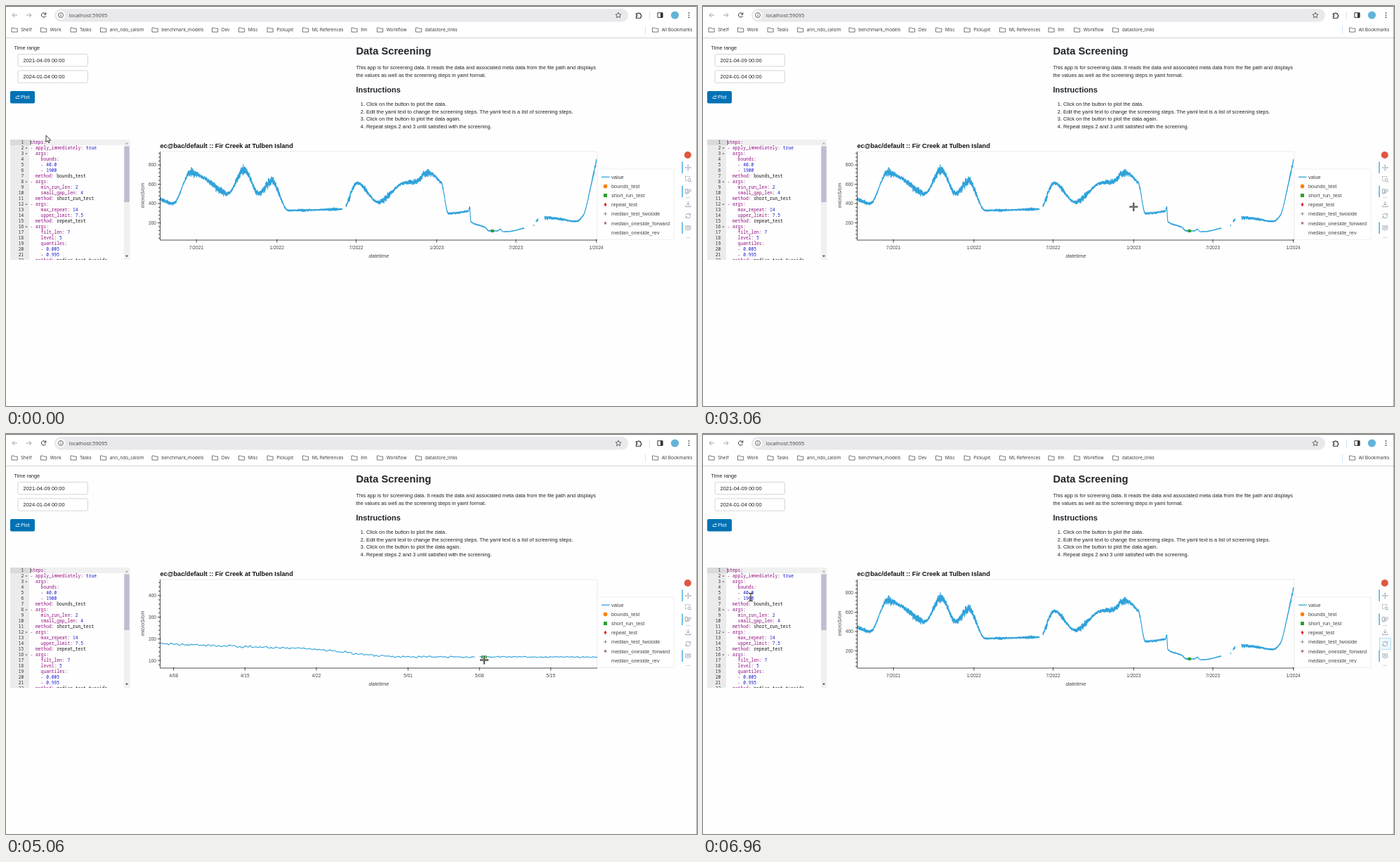
Write an HTML page that moves like this. It is 984 px wide and 569 px high and loops after 8000 ms.

```html
<!DOCTYPE html>
<html lang="en">
<head>
<meta charset="utf-8">
<title>Data Screening</title>
<style>
html, body { margin: 0; width: 100%; height: 100%; overflow: hidden; background: #fefefe; }
svg { display: block; position: absolute; left: 0; top: 0; }
text { font-family: "Liberation Sans", Arial, sans-serif; }
.ui { font-family: "Open Sans", "Noto Sans", sans-serif; }
.code { font-family: "Noto Sans Mono", "Liberation Mono", monospace; font-size: 6.3px; }
</style>
</head>
<body>
<svg id="stage" width="984" height="569" viewBox="0 0 984 569"></svg>
<script>
const LOOP = 8000, BLUE = '#30a2da';
const PLOT = { x: 219.5, y: 207, r: 842, b: 333 };
const stage = document.getElementById('stage');

// ---------- markup helpers ----------
const text = (x, y, s, size, more = 'fill="#222"') => `<text x="${x}" y="${y}" font-size="${size}" ${more}>${s}</text>`;
const rect = (x, y, w, h, fill, more = '') => `<rect x="${x}" y="${y}" width="${w}" height="${h}" fill="${fill}" ${more}/>`;
const line = (d, color, w = 1, more = '') => `<path d="${d}" fill="none" stroke="${color}" stroke-width="${w}" ${more}/>`;
const dot = (x, y, r, fill) => `<circle cx="${x}" cy="${y}" r="${r}" fill="${fill}"/>`;
const icon = (x, y, d, color = '#444', w = 0.9) => line(d, color, w, `transform="translate(${x} ${y})"`);

// ---------- browser frame ----------
function browser() {
  const folders = { Shelf: 12, Work: 53.5, Tasks: 96, ann_ndo_calsim: 138.5, benchmark_models: 212, Dev: 297.5, Misc: 335.5,
    Pickupit: 376, 'ML References': 426.5, llm: 496, Workflow: 532.5, datastore_links: 587.5, 'All Bookmarks': 924.5 };
  const arrow = 'M3.5 0H-3.5M-.5 -3L-3.5 0L-.5 3';
  let s = rect(0, 0, 984, 45, '#fff') + rect(0, 0, 984, 1, '#666') + rect(0, 45, 984, 1, '#d2d2d2') + rect(983, 0, 1, 569, '#aaa');
  s += rect(69, 4, 817, 18.5, '#e9e9eb', 'rx="9.2"') + dot(78, 13, 6.5, '#fbfbfb');
  s += icon(12.5, 13, arrow, '#999') + line(arrow, '#999', 0.9, 'transform="translate(32.5 13) scale(-1 1)"');
  s += icon(53.5, 13, 'M2.9 -1.4A3.1 3.1 0 1 0 3 1M3.3 -3.6V-.9H.6', '#333', 1);
  s += '<circle cx="78" cy="13" r="3.5" fill="none" stroke="#444" stroke-width=".8"/>' + icon(78, 13, 'M0 -.4V2M0 -2V-1.2', '#444', 0.8);
  s += text(89.5, 15.8, 'localhost:59095', 7.5, 'class="ui" fill="#444"');
  s += icon(872, 13, 'M0 -4L1.2 -1.3L4 -1L1.9 .9L2.5 3.7L0 2.2L-2.5 3.7L-1.9 .9L-4 -1L-1.2 -1.3Z', '#444', 0.8);
  s += icon(901, 13.3, 'M-3.6 -2.4H-1.4A1.2 1.2 0 1 1 1 -2.4H2.8V-.5A1.2 1.2 0 1 1 2.8 2V4H-3.6V1.8A1.2 1.2 0 1 0 -3.6 -.5Z', '#333', 1.1);
  s += rect(916, 8, 0.8, 11, '#c6dcf5') + icon(931.5, 13, 'M-3.6 -3.3H3.6V3.3H-3.6Z', '#333', 1) + rect(932, 10, 3.2, 6.5, '#333');
  s += dot(952.5, 13, 5.6, '#62b4d8');
  for (let i = -1; i < 2; i++) s += dot(972.5, 13 + i * 3.2, 0.85, '#333');
  for (const name in folders) {
    const x = folders[name];
    s += icon(x, 34, 'M-4 -3H-1L0 -2H4.2V3H-4Z', '#555', 0.8) + text(x + 9.2, 36.4, name, 6.55, 'class="ui" fill="#333"');
  }
  return s + rect(910, 29, 0.8, 11, '#c6dcf5');
}

// ---------- page texts and form ----------
function page() {
  let s = text(11.5, 62, 'Time range', 7.3);
  ['2021-04-09 00:00', '2024-01-04 00:00'].forEach((v, i) => {
    const y = 68.5 + i * 23.4;
    s += rect(17, y, 99.5, 17.3, '#fff', 'rx="2" stroke="#ccc" stroke-width=".8"') + text(24.5, y + 11.3, v, 7.5);
  });
  s += rect(6, 121, 35, 17.5, '#0072b5', 'rx="2"') + text(21, 132, 'Plot', 7.3, 'fill="#fff"');
  s += icon(16.5, 129.5, 'M2.6 2H-2.4V.2L-1 -1.2H2.6M1.2 -2.4L2.6 -1.2L1.2 0', '#fff', 0.8);
  s += text(498.5, 69.4, 'Data Screening', 14.7, 'font-weight="700" fill="#212529"');
  s += text(498.5, 90, 'This app is for screening data. It reads the data and associated meta data from the file path and displays', 7.4);
  s += text(498.5, 101, 'the values as well as the screening steps in yaml format.', 7.4);
  s += text(498.5, 122.5, 'Instructions', 11.1, 'font-weight="700" fill="#212529"');
  ['Click on the button to plot the data.',
    'Edit the yaml text to change the screening steps. The yaml text is a list of screening steps.',
    'Click on the button to plot the data again.',
    'Repeat steps 2 and 3 until satisfied with the screening.'].forEach((item, i) => {
    const y = 142 + i * 10.65;
    s += text(504.8, y, i + 1 + '.', 7.4) + text(513, y, item, 7.4);
  });
  return s;
}

// ---------- yaml editor ----------
const YAML = `steps:
- apply_immediately: true
  args:
    bounds:
    - 40.0
    - 1900
  method: bounds_test
- args:
    min_run_len: 2
    small_gap_len: 4
  method: short_run_test
- args:
    max_repeat: 14
    upper_limit: 7.5
  method: repeat_test
- args:
    filt_len: 7
    level: 5
    quantiles:
    - 0.005
    - 0.995
  method: median_test_twoside`;

function editor() {
  const span = (s, color) => s ? `<tspan fill="${color}">${s}</tspan>` : '';
  let s = rect(6, 190, 27, 171, '#ebebeb') + rect(6, 190, 27, 8, '#dadada') + rect(33, 190, 135, 8, '#f0f0f0');
  YAML.split('\n').forEach((row, i) => {
    const [, pad, dash, key, value] = row.match(/^(\s*)(- )?(\w+: ?)?(.*)$/);
    const y = 196.3 + i * 8;
    s += text(25.3, y, i + 1, 6.3, 'class="code" text-anchor="end" fill="#333"');
    if ((dash && key) || i === 2) s += `<path d="M27.4 ${y - 2.8}h3l-1.5 1.8z" fill="#555"/>`;
    s += `<text class="code" x="${34.5 + pad.length * 3.78}" y="${y}">` + span(dash, '#b90690') + span(key, '#930f80') +
      span(value, /^(\d|true)/.test(value) ? '#1a1acd' : '#111') + '</text>';
  });
  s += rect(34.4, 190.5, 0.7, 7.5, '#333');
  s += rect(168, 190, 8.5, 171, '#f0f0f0') + rect(168.3, 199.5, 7.4, 79.5, '#bfbdd2');
  s += '<path d="M170 196.4h4l-2 -2.4z" fill="#a5a5a5"/><path d="M170 354.8h4l-2 2.4z" fill="#444"/>';
  return `<g clip-path="url(#edit)">${s}</g>`;
}

// ---------- plot surroundings ----------
function plotFrame() {
  const label = 'fill="#444" font-style="italic" text-anchor="middle"';
  return text(219.5, 202.2, 'ec@bac/default :: Fir Creek at Tulben Island', 9.15, 'font-weight="700" fill="#111"') +
    line(`M${PLOT.x} ${PLOT.y}H${PLOT.r}V${PLOT.b}`, '#e5e5e5', 0.8) +
    text(531, 357.6, 'datetime', 7.5, label) +
    text(0, 0, 'microS/cm', 7.5, label + ' transform="translate(196.8 269.5) rotate(-90)"');
}

function legend() {
  let s = rect(842, 232, 109, 100.5, '#fff', 'stroke="#ececec" stroke-width=".8"');
  ['value', 'bounds_test', 'short_run_test', 'repeat_test', 'median_test_twoside', 'median_oneside_forward', 'median_oneside_rev']
    .forEach((name, i) => { s += text(862, 245.8 + i * 13.15, name, 7.4, 'fill="#444"'); });
  s += line('M848 243.3H859.5', BLUE, 1.3) + dot(853.5, 256.4, 2.8, '#ff7f0e') + rect(851, 267, 5, 5, '#2ca02c');
  s += '<path d="M853.5 279.4l2 3.1l-2 3.1l-2 -3.1z" fill="#e02a2a"/>';
  s += icon(853.5, 295.6, 'M-2.4 0H2.4M0 -2.4V2.4', '#777', 0.8);
  return s + icon(853.5, 308.9, 'M-2 0H2M0 -2V2M-1.5 -1.5L1.5 1.5M-1.5 1.5L1.5 -1.5', '#8c564b', 0.8);
}

function toolbar() {
  const grey = '#98a0a4';
  let s = dot(970.8, 212, 5, '#e0573f');
  for (const y of [221.5, 255.5, 307.5]) s += rect(962.3, y, 1.6, 16.5, '#54b3e6');
  s += icon(971.3, 230, 'M-4 0H4M0 -4V4M-2.8 -1.2L-4 0L-2.8 1.2M2.8 -1.2L4 0L2.8 1.2M-1.2 -2.8L0 -4L1.2 -2.8M-1.2 2.8L0 4L1.2 2.8', grey, 0.8);
  s += line('M967.5 242.5H974V245M967.5 242.5V249H970', grey, 0.9, 'stroke-dasharray="1.4 .9"');
  s += icon(973, 247.8, 'M2 0A2 2 0 1 0 -2 0A2 2 0 1 0 2 0M1.5 1.5L3 3', grey);
  s += icon(971.3, 264, 'M-4 -3.4H-.6V2H-4ZM-2.4 2V4M4 -1.5A1.8 1.8 0 1 0 .4 -1.5A1.8 1.8 0 1 0 4 -1.5M1 0L0 3.4', grey);
  s += icon(971.3, 282, 'M0 -4V1.3M-2 -.8L0 1.3L2 -.8M-3.6 1.5V3.6H3.6V1.5', grey);
  s += icon(971.3, 298.5, 'M-3.4 -.6A3.5 3.5 0 0 1 3 -1.6M3.4 -3.4V-1.2H1.2M3.4 .6A3.5 3.5 0 0 1 -3 1.6M-3.4 3.4V1.2H-1.2', grey);
  s += icon(971.3, 315.8, 'M-3.5 -3H3.5V2H1.2L0 3.6L-1.2 2H-3.5ZM-2 -1.3H2M-2 .4H2', grey, 0.8);
  for (const y of [272.5, 329.3]) for (let i = -1; i < 2; i++) s += dot(971.3 + i * 2, y, 0.5, '#888');
  return s;
}

// ---------- conductance series over days since 2021-04-09 ----------
const FULL = 0.6231, START = Date.UTC(2021, 3, 9), MID = 759.47;

// monotone cubic through key points given in overview pixels
function curve(...keys) {
  const p = keys.map(([x, y]) => [(x - PLOT.x) / FULL, 100 + (322.2 - y) / 0.1372]);
  const n = p.length - 1;
  const s = p.slice(1).map((q, i) => (q[1] - p[i][1]) / (q[0] - p[i][0]));
  const m = p.map((_, i) => i === 0 ? s[0] : i === n ? s[n - 1] : s[i - 1] * s[i] > 0 ? 2 * s[i - 1] * s[i] / (s[i - 1] + s[i]) : 0);
  const value = d => {
    const i = Math.max(0, Math.min(n - 1, p.findIndex(q => q[0] > d) - 1));
    const h = p[i + 1][0] - p[i][0], f = (d - p[i][0]) / h, g = 1 - f;
    return g * g * (1 + 2 * f) * p[i][1] + f * f * (1 + 2 * g) * p[i + 1][1] + f * g * h * (g * m[i] - f * m[i + 1]);
  };
  return { from: p[0][0], to: p[n][0], value };
}

const RUNS = [
  curve([220, 275], [238, 281], [263, 237], [284, 246], [316, 267], [339, 233], [360, 267], [378, 249], [402, 291], [479, 289]),
  curve([484, 285], [500, 252], [530, 279], [566, 252], [584, 250], [599, 237], [620, 252], [630, 295], [658.5, 291.5],
    [660.3, 286], [662, 307], [682, 315], [688, 320], [700, 320], [704, 317.5], [707.1, 321]),
  curve([708.3, 321], [714, 321], [738, 316]),
  curve([751, 313], [752, 311]),
  curve([755, 307], [757.5, 303]),
  curve([767, 301], [789, 303], [812, 306.5], [822, 298], [833, 256], [841, 219])
];

const rand = n => { const v = Math.sin(n * 127.1 + 11.7) * 43758.5453; return v - Math.floor(v); };
function noise(k) {
  const i = Math.floor(k), a = rand(i);
  return a + (rand(i + 1) - a) * (k - i);
}
// tide plus weather; its strength drifts over weeks
function reading(run, d) {
  const base = run.value(d);
  const swing = base * (0.02 + 0.06 * noise(d / 18) ** 2);
  const tide = 0.35 * Math.sin(d * 2 * Math.PI / 0.5175);
  return base + swing * (tide + 1.3 * (noise(d * 6) - 0.5) + 0.9 * (noise(d * 1.7 + 400) - 0.5));
}

// ---------- plot view ----------
const near = (list, span, size = u => u) =>
  list.reduce((a, b) => Math.abs(span / size(b) - 6) < Math.abs(span / size(a) - 6) ? b : a);
const MONTH = 30.44;
const CALENDAR = [6, 4, 2, 1].map(every => ({ unit: every * MONTH, every, days: [1] }))
  .concat({ unit: 14, every: 1, days: [1, 15] }, { unit: 7, every: 1, days: [1, 8, 15, 22] });

function drawView(sx) {
  const sy = Math.max(0.1372, 0.0212 * sx);
  const mid = 692.7 - 11.7 * Math.min(1, Math.log(sx / FULL) / Math.log(10.4));
  const px = d => mid + sx * (d - MID);
  const py = v => 322.1 - (v - 100) * sy;
  const from = MID - (mid - PLOT.x) / sx, to = from + (PLOT.r - PLOT.x) / sx;

  const step = sx < 2 ? 0.13 : 0.05;
  let path = '';
  for (const run of RUNS) {
    let pen = 'M';
    const end = Math.min(run.to, to + 1);
    for (let i = Math.ceil(Math.max(run.from, from - 1) / step); i * step <= end; i++) {
      const d = i * step;
      if (Math.abs(d - 758.8) < 0.2) { pen = 'M'; continue; }
      path += pen + px(d).toFixed(1) + ' ' + py(reading(run, d)).toFixed(1);
      pen = 'L';
    }
  }
  let s = '<g clip-path="url(#plot)">' + line(path, BLUE, 1.15, 'stroke-linejoin="round"');
  for (const d of [MID - 0.15, MID + 0.1]) s += rect(px(d) - 2, py(116) - 2, 4, 4, '#2ca02c');
  s += '</g>';

  let ticks = `M${PLOT.x} ${PLOT.y}V${PLOT.b}H${PLOT.r}`, labels = '';
  const small = 'fill="#444" text-anchor=';
  const span = (PLOT.b - PLOT.y) / sy, major = near([500, 200, 100, 50, 20], span);
  for (let n = 0; n <= 60; n++) {
    const v = n * major / 5, y = py(v);
    if (y < PLOT.y || y > PLOT.b) continue;
    ticks += n % 5 ? `M${PLOT.x} ${y}h-2.4` : `M${PLOT.x + 1.2} ${y}h-4.8`;
    if (n % 5 === 0) labels += text(214, y + 2.4, v, 6.6, small + '"end"');
  }
  const { unit, every, days } = near(CALENDAR, to - from, c => c.unit);
  for (let m = 0; m <= 36; m += every) for (const day of days) {
    const date = new Date(Date.UTC(2021, m, day)), x = px((date - START) / 864e5);
    if (x < PLOT.x || x > PLOT.r) continue;
    const tail = unit > MONTH - 1 ? date.getUTCFullYear() : String(day).padStart(2, '0');
    ticks += `M${x} ${PLOT.b - 1.2}v4.8`;
    labels += text(x, 345.6, date.getUTCMonth() + 1 + '/' + tail, 6.6, small + '"middle"');
  }
  return s + line(ticks, '#222', 0.8) + labels;
}

// ---------- timeline ----------
const RESET = 6620;
const ZOOMS = [ // start, end, steps, factor
  [3160, 3300, 5, 10.475], [3830, 4630, 10, 2], [4730, 5060, 5, 1.112], [5200, 6000, 16, 1.36]];
const MOVES = [ // time, x, y
  [500, 57, 184], [600, 70, 168], [760, 132, 230], [980, 90, 350], [1130, 67, 356], [1360, 67, 356], [1960, 55, 238],
  [2330, 55, 238], [2600, 200, 210], [3130, 675, 297], [3300, 681, 321.5], [6030, 681, 321.5], [6300, 572, 306],
  [6460, 572, 306], [6600, 971, 298], [6960, 68, 232]];
const clamp = f => Math.max(0, Math.min(1, f));

function zoomAt(t) {
  if (t >= RESET) return FULL;
  return ZOOMS.reduce((sx, [a, b, n, factor]) => sx * factor ** (Math.round(clamp((t - a) / (b - a)) * (n - 1)) / (n - 1)), FULL);
}

function pointerAt(t) {
  const next = MOVES.findIndex(m => m[0] > t);
  const b = next < 0 ? MOVES.length - 1 : next, a = Math.max(0, b - 1);
  const [t0, x0, y0] = MOVES[a], [t1, x1, y1] = MOVES[b];
  const f = a === b ? 0 : clamp((t - t0) / (t1 - t0));
  return [x0 + (x1 - x0) * f, y0 + (y1 - y0) * f];
}

const inside = (x, y, l, t, r, b) => x > l && x < r && y > t && y < b;
const cursorFor = (x, y) => inside(x, y, 33, 190, 168, 361) ? 'beam' : inside(x, y, 219, 207, 842, 333) ? 'cross' : 'arrow';

const beam = 'M-3 -5.5H-.8L0 -4.8L.8 -5.5H3M0 -4.8V4.8M-3 5.5H-.8L0 4.8L.8 5.5H3';
const cross = 'M-6 0H6M0 -6V6';
stage.innerHTML = `<defs><clipPath id="edit">${rect(6, 190, 171, 171, '#000')}</clipPath>
  <clipPath id="plot">${rect(PLOT.x, PLOT.y, PLOT.r - PLOT.x, PLOT.b - PLOT.y, '#000')}</clipPath></defs>` +
  rect(0, 0, 984, 569, '#fefefe') + browser() + page() + editor() + plotFrame() + legend() + '<g id="view"></g>' + toolbar() +
  rect(963.3, 290.3, 16, 16, '#54b3e6', 'id="hover" fill-opacity=".08" stroke="#9fd3f0" stroke-width=".8"') +
  `<g id="cursor">
    <path id="arrow" d="M0 0V9.5L2.2 7.5L3.7 10.8L5.2 10.1L3.8 7H6.7Z" fill="#fff" stroke="#111" stroke-width=".8"/>
    <g id="beam">${line(beam, '#222', 1.1)}</g>
    <g id="cross">${line(cross, '#fff', 3.6)}${line(cross, '#444', 2.3)}${line('M-5 0H5M0 -5V5', '#aaa', 0.5)}</g></g>`;

const part = id => document.getElementById(id);
const view = part('view'), cursor = part('cursor'), hover = part('hover');
const shapes = ['arrow', 'beam', 'cross'].map(part);
let shown = 0;

function render(t) {
  const sx = zoomAt(t);
  if (sx !== shown) { view.innerHTML = drawView(sx); shown = sx; }
  const [x, y] = pointerAt(t), kind = cursorFor(x, y);
  cursor.setAttribute('transform', `translate(${x.toFixed(1)} ${y.toFixed(1)})`);
  for (const el of shapes) el.style.display = el.id === kind ? '' : 'none';
  hover.style.display = t >= RESET - 25 ? '' : 'none';
}

function tick() {
  render(performance.now() % LOOP);
  requestAnimationFrame(tick);
}
tick();
</script>
</body>
</html>
```
